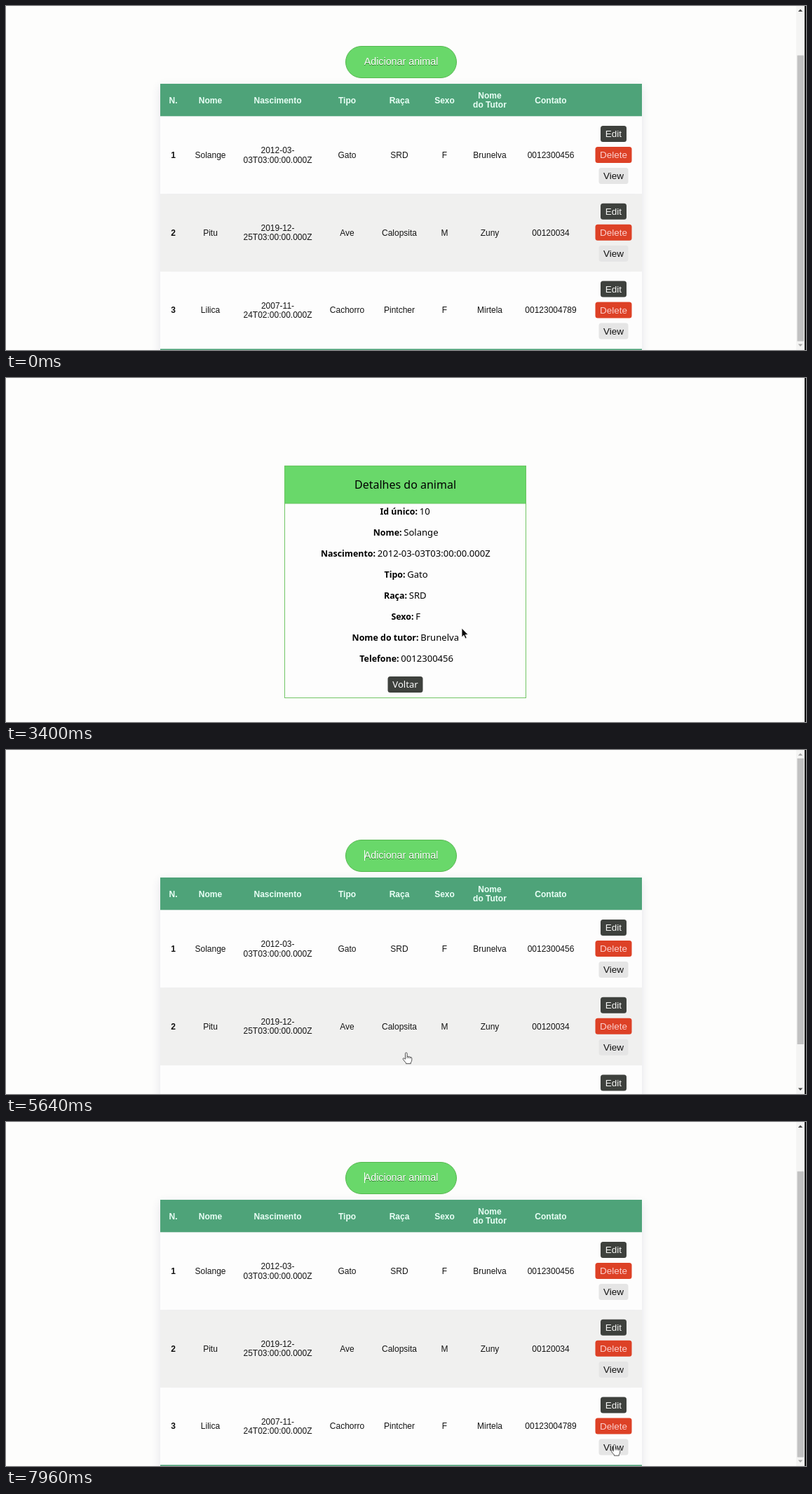
An HTML page for the animation above (8000 ms loop, 1141 px wide and 491 px high).

```html
<!DOCTYPE html>
<html lang="pt">
<head>
<meta charset="utf-8">
<title>Animais</title>
<style>
  html, body { margin: 0; width: 100%; height: 100%; overflow: hidden; background: #fdfdfc; }
  svg { display: block; width: 1141px; height: 491px; }
  text { text-anchor: middle; fill: #151515; }
  .cell { font: 12px "Liberation Sans", Arial, sans-serif; }
  .head { font: bold 12px "Liberation Sans", Arial, sans-serif; fill: #e9fff6; }
  .btn { font: 13.5px "Liberation Sans", Arial, sans-serif; }
  .add { font: 14.3px "Liberation Sans", Arial, sans-serif; }
  .title { font: 16px "Noto Sans", sans-serif; fill: #000; }
  .info { font: 13.1px "Noto Sans", sans-serif; text-anchor: start; fill: #000; }
  .label { font: bold 12.4px "Noto Sans", sans-serif; text-anchor: end; fill: #000; }
</style>
</head>
<body>
<svg id="stage" viewBox="0 0 1141 491"></svg>
<script>
const LOOP = 8000, STEP = 40, MAX_SCROLL = 71;
const GREEN = '#69d86a', TEAL = '#4ea379', DARK = '#3e413d';

const rect = (x, y, w, h, fill, extra = '') =>
  `<rect x="${x}" y="${y}" width="${w}" height="${h}" fill="${fill}" ${extra}/>`;
const text = (x, y, cls, str, extra = '') =>
  `<text x="${x}" y="${y}" class="${cls}" ${extra}>${str}</text>`;

// One or two centred lines around y
function lines(x, y, cls, str) {
  const parts = str.split('|');
  if (parts.length === 1) return text(x, y + 4.3, cls, str);
  return text(x, y - 2.4, cls, parts[0]) + text(x, y + 11, cls, parts[1]);
}

function button(cx, cy, w, fill, color, str) {
  return rect(cx - w / 2, cy - 11.5, w, 23, fill, 'rx="3.5"') +
    text(cx, cy + 4.6, 'btn', str, `style="fill:${color}"`);
}

const columns = [238.5, 291.5, 387.5, 486.5, 561, 625.5, 690, 777];
const heads = ['N.', 'Nome', 'Nascimento', 'Tipo', 'Raça', 'Sexo', 'Nome|do Tutor', 'Contato'];
const rows = [
  ['1', 'Solange', '2012-03-|03T03:00:00.000Z', 'Gato', 'SRD', 'F', 'Brunelva', '0012300456'],
  ['2', 'Pitu', '2019-12-|25T03:00:00.000Z', 'Ave', 'Calopsita', 'M', 'Zuny', '00120034'],
  ['3', 'Lilica', '2007-11-|24T02:00:00.000Z', 'Cachorro', 'Pintcher', 'F', 'Mirtela', '00123004789']
];

function tablePage() {
  let s = rect(220, 186, 687, 390, '#43436e', 'opacity=".13" filter="url(#soft)"');
  s += rect(484.5, 128.5, 158, 45, GREEN, 'rx="22.5" stroke="#55b84f"');
  s += text(563.5, 156, 'add', 'Adicionar animal', 'style="fill:#2f7a2c"');
  s += text(563.5, 155, 'add', 'Adicionar animal', 'style="fill:#fff"');
  s += rect(220, 182, 687, 46.5, TEAL);
  heads.forEach((h, i) => s += lines(columns[i], 205.2, 'head', h));
  rows.forEach((row, r) => {
    const top = 228.5 + r * 110.8, mid = top + 55;
    s += rect(220, top, 687, 110.8, r % 2 ? '#f0f0ef' : '#fdfdfd');
    row.forEach((v, i) => {
      s += i ? lines(columns[i], mid, 'cell', v)
        : text(columns[i], mid + 4.3, 'head', v, 'style="fill:#111"');
    });
    s += button(866.5, mid - 30, 37, DARK, '#f6f6f4', 'Edit');
    s += button(866.5, mid, 52, '#dd4126', '#fbcfcd', 'Delete');
    s += button(866.5, mid + 30, 42, '#e5e5e5', '#111', 'View');
  });
  return s + rect(220, 560.4, 687, 20, TEAL);
}

// Label, value, left edge of the value
const details = [
  ['Id único:', '10', 590], ['Nome:', 'Solange', 567.5],
  ['Nascimento:', '2012-03-03T03:00:00.000Z', 530], ['Tipo:', 'Gato', 572.5],
  ['Raça:', 'SRD', 575], ['Sexo:', 'F', 584.5],
  ['Nome do tutor:', 'Brunelva', 591.5], ['Telefone:', '0012300456', 563.5]
];

function detailPage() {
  let s = rect(397.5, 125.5, 344, 331, '#fdfdfd', 'stroke="#72c566"');
  s += rect(397.5, 125.5, 344, 53.5, GREEN, 'stroke="#67c45e"');
  s += text(569.5, 158, 'title', 'Detalhes do animal');
  details.forEach(([label, value, x], i) => {
    const y = 194.8 + i * 30;
    s += text(x - 3, y, 'label', label) + text(x - .3, y, 'info', value);
  });
  s += rect(544.5, 426, 50, 23, DARK, 'rx="3.5"');
  return s + text(569.5, 442.3, 'info', 'Voltar', 'style="fill:#fff;text-anchor:middle"');
}

document.getElementById('stage').innerHTML = `
  <defs><filter id="soft" filterUnits="userSpaceOnUse" x="180" y="140" width="770" height="480">
    <feGaussianBlur stdDeviation="7"/></filter></defs>
  ${rect(0, 0, 1141, 491, '#fdfdfc')}
  <g id="list"><g id="sheet">${tablePage()}${rect(511, 143, 1, 15, '#fff', 'id="listCaret"')}</g>
    ${rect(1127, 0, 12, 491, '#f4f4f3')}
    ${rect(1128.5, 12, 9.5, 408, '#c1c1c1', 'id="thumb"')}
    <path id="up" d="M1129.8 8h6.4l-3.2-3.6z"/>
    <path id="down" d="M1129.8 482.5h6.4l-3.2 3.6z"/></g>
  <g id="card">${detailPage()}${rect(497, 143, 1, 18, '#111', 'id="cardCaret"')}</g>
  ${rect(1139, 0, 2, 491, '#0c0c0c')}
  <path id="arrow" d="M0 0V13L3 10.2L5 15L7.2 14.2L5.2 9.5H9.2Z" fill="#0a0a0a" stroke="#fff" stroke-width=".8"/>
  <path id="hand" d="M-1.5 9V1.2Q-1.5 0 -.2 0T1.1 1.2V5.6Q2.2 4.9 3.4 5.9Q4.6 5.3 5.6 6.4Q7.6 6 7.8 8V10.5Q7.6 13 6.3 14V15.7H-.6V14.5Q-3 12.3 -4.8 9.2Q-5 7.6 -3.4 7.8L-1.5 9.6M3.4 5.9V8M5.6 6.4V8.4M1.1 5.6V8"
    fill="#fff" stroke="#484848" stroke-width=".95" stroke-linejoin="round"/>`;

const el = {};
document.querySelectorAll('[id]').forEach(n => el[n.id] = n);

const show = (node, on) => node.setAttribute('visibility', on ? 'inherit' : 'hidden');
const move = (node, x, y) => node.setAttribute('transform', `translate(${x} ${y})`);
const clamp = v => Math.max(0, Math.min(1, v));
const ease = v => v * v * (3 - 2 * v);
const within = (t, a, b) => t >= a && t < b;

// Pointer stops: time, x, y
const path = [
  [1120, 700, 430], [1640, 835, 259], [1680, 835, 259], [2000, 858, 244], [2960, 858, 244],
  [3400, 650, 357], [3960, 650, 357], [4320, 571, 432], [6840, 571, 432],
  [7000, 600, 440], [7440, 600, 440], [7920, 868, 460.5]
];

function pointer(t) {
  const i = path.findIndex(p => p[0] > t);
  if (i < 0) return path[path.length - 1].slice(1);
  if (i === 0) return path[0].slice(1);
  const [a, x0, y0] = path[i - 1], [b, x1, y1] = path[i];
  const k = ease((t - a) / (b - a));
  return [x0 + (x1 - x0) * k, y0 + (y1 - y0) * k];
}

function scrollAt(t) {
  if (t < 5480) return MAX_SCROLL;
  const first = 44 * Math.pow(clamp((t - 6040) / 160), 3.4);
  const second = (MAX_SCROLL - 44) * ease(clamp((t - 6640) / 160));
  return Math.round(first + second);
}

function draw(t) {
  const onList = t < 2400 || t >= 5640, onCard = within(t, 2520, 5480);
  show(el.list, onList);
  show(el.card, onCard);

  const scroll = scrollAt(t);
  move(el.sheet, 0, -scroll);
  move(el.thumb, 0, scroll * 58.5 / MAX_SCROLL);
  el.up.setAttribute('fill', scroll > 0 ? '#454545' : '#a6a6a6');
  el.down.setAttribute('fill', scroll < MAX_SCROLL ? '#454545' : '#a6a6a6');

  // The caret blinks every 600 ms, starting again with each page
  const start = t < 2400 ? 160 : t < 5480 ? 2520 : 5480;
  const blink = t >= start && Math.floor((t - start) / 600) % 2 === 0;
  show(el.listCaret, onList && blink);
  show(el.cardCaret, onCard && blink);

  const [x, y] = pointer(t);
  const hand = within(t, 1840, 3000) || within(t, 4200, 6000) || t >= 7800;
  show(el.hand, hand);
  show(el.arrow, !hand && t >= 1160);
  move(el.hand, x, y);
  move(el.arrow, x, y);
}

function tick() {
  const t = performance.now() % LOOP;
  draw(Math.floor(t / STEP) * STEP);
  requestAnimationFrame(tick);
}
tick();
</script>
</body>
</html>
```
